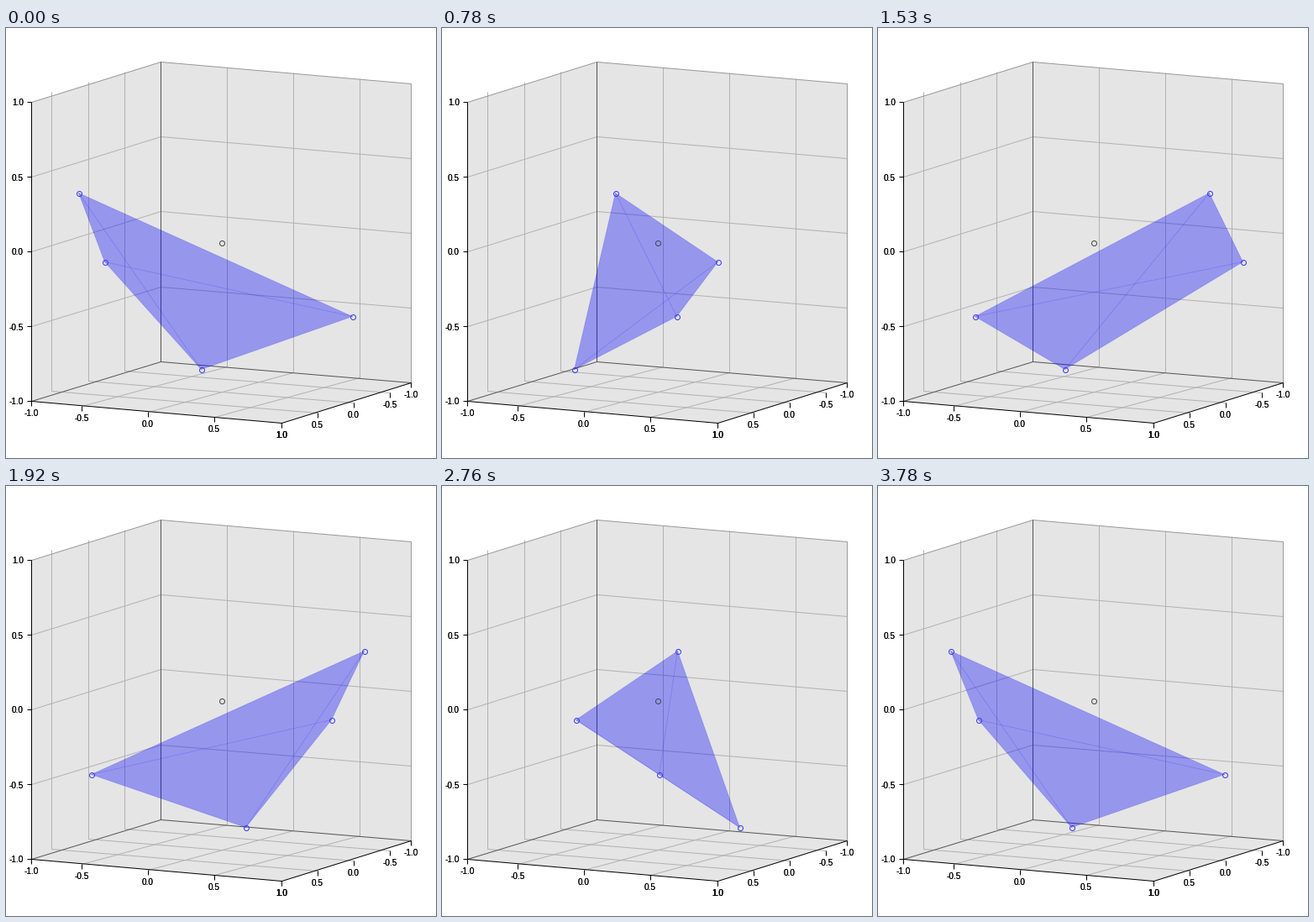
Animation, 512 px wide and 512 px high, one loop 3.81 s. Source, as a matplotlib script:

```python
import itertools
import math

import matplotlib.pyplot as plt
import numpy as np
from matplotlib.animation import FuncAnimation

SIZE, DPI = 512, 128
PX = 72 / DPI                      # one pixel in points
CENTER = np.array([255.8, 255.0])
SCALE = 180.2
AZIM, ELEV = 0.5, 0.15
LEFT, RIGHT = 30, 482              # box corners are clamped to this range
FRAMES, STEP = 127, 0.05
TICKS = np.linspace(-1, 1, 5)
BLUE = (0, 0, 1)
GRID, RIM, BACK, FRONT = "#b2b2b2", "#999999", "#555555", "black"

# Points on the unit sphere: (height, phase in degrees)
VERTICES = [(0.327, 181.6), (-0.127, 140.8), (-0.4875, -7.2), (-0.8366, 256)]

plt.rcParams["font.family"] = "Liberation Sans"
plt.rcParams["path.snap"] = False
fig = plt.figure(figsize=(SIZE / DPI, SIZE / DPI), dpi=DPI, facecolor="white")
ax = fig.add_axes([0, 0, 1, 1])
ax.set_xlim(-0.5, SIZE - 0.5)
ax.set_ylim(SIZE - 0.5, -0.5)
ax.axis("off")


def project(x, y, z):
    """Orthographic view, rounded to whole pixels."""
    c, s = math.cos(AZIM), math.sin(AZIM)
    depth = s * x + c * y
    sx = CENTER[0] + SCALE * (c * x - s * y)
    sy = CENTER[1] + SCALE * (math.sin(ELEV) * depth - math.cos(ELEV) * z)
    return min(max(round(sx), LEFT), RIGHT), round(sy)


def segment(points, color):
    ax.plot(*zip(*points), color=color, lw=PX, solid_capstyle="butt", zorder=2)


def path(color, *corners):
    segment([project(*p) for p in corners], color)


def label(x, y, value, align="center"):
    # Drawn twice for a slightly heavier weight
    for _ in range(2):
        ax.text(x, y, f"{value:.1f}", ha=align, va="center_baseline",
                fontsize=10 * PX, color="black")


def draw_walls():
    square = [(-1, -1), (1, -1), (1, 1), (-1, 1)]
    for axis in range(3):
        wall = np.insert(square, axis, -1, axis=1)
        ax.fill(*zip(*[project(*p) for p in wall]), color="#e5e5e5", lw=0)


def draw_grid():
    for t in TICKS[1:-1]:
        path(GRID, (-1, 1, t), (-1, -1, t), (1, -1, t))
        path(GRID, (t, 1, -1), (t, -1, -1), (t, -1, 1))
        path(GRID, (1, t, -1), (-1, t, -1), (-1, t, 1))


def draw_axes():
    path(RIM, (-1, 1, 1), (-1, -1, 1), (1, -1, 1), (1, -1, -1))
    path(BACK, (-1, 1, -1), (-1, -1, -1), (1, -1, -1))
    path(BACK, (-1, -1, -1), (-1, -1, 1))
    path(FRONT, (-1, 1, 1), (-1, 1, -1), (1, 1, -1), (1, -1, -1))
    for t in TICKS:
        x, y = project(-1, 1, t)
        segment([(x - 5, y), (x, y)], FRONT)
        label(x - 9.5, y, t, "right")
        for x, y in (project(t, 1, -1), project(1, t, -1)):
            segment([(x, y), (x, y + 6)], FRONT)
            label(x - 0.5, y + 13.5, t)


def vertex(height, phase, angle):
    radius = math.sqrt(1 - height ** 2)
    offset = np.array([radius * math.cos(angle - math.radians(phase)), -height])
    return np.round(CENTER + SCALE * offset)


draw_walls()
draw_grid()
draw_axes()

FACES = list(itertools.combinations(range(4), 3))
EDGES = list(itertools.combinations(range(4), 2))

# Every spot of the solid is covered by one front and one back face
faces = [ax.fill([0, 0, 0], [0, 0, 0], color=BLUE, alpha=0.19, lw=0, zorder=4)[0]
         for _ in FACES]
edges = [ax.plot([], [], color=BLUE, alpha=0.18, lw=0.8 * PX, zorder=5)[0]
         for _ in EDGES]
ring = dict(ls="", marker="o", ms=6 * PX, mfc="none", mew=PX, zorder=6)
ax.plot(*np.round(CENTER), mec="#444444", **ring)
dots, = ax.plot([], [], mec="#3838f0", **ring)


def update(frame):
    pts = np.array([vertex(h, p, frame * STEP) for h, p in VERTICES])
    for patch, ids in zip(faces, FACES):
        patch.set_xy(pts[list(ids)])
    for line, ids in zip(edges, EDGES):
        line.set_data(*pts[list(ids)].T)
    dots.set_data(*pts.T)
    return [*faces, *edges, dots]


anim = FuncAnimation(fig, update, frames=FRAMES, interval=30,
                     repeat=True, repeat_delay=0)
plt.show()
```
